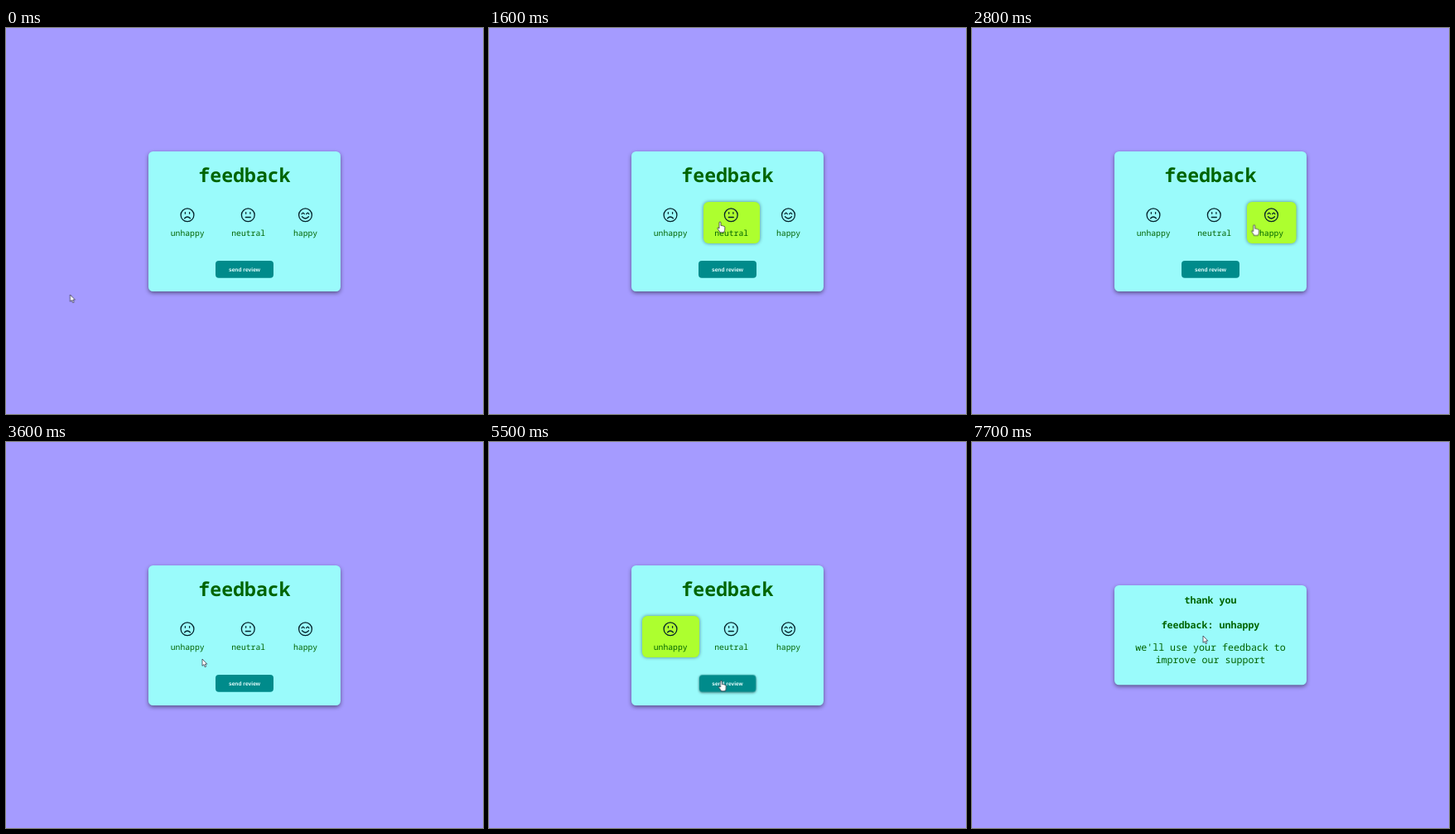
Animation of 576 by 466 pixels, one loop 8 s. Source, as an HTML page:

```html
<!DOCTYPE html>
<html lang="en">
<head>
<meta charset="utf-8">
<title>Feedback</title>
<style>
html, body { margin: 0; width: 100%; height: 100%; overflow: hidden; background: #a59bff; }
svg { display: block; width: 576px; height: 466px; }
text { font-family: "Noto Sans Mono", monospace; fill: #006400; text-anchor: middle; text-rendering: geometricPrecision; }
.title { font-size: 23.2px; font-weight: 700; }
.label { font-size: 9.72px; }
.note { font-size: 11.65px; }
.bold { font-weight: 700; }
.card { fill: #9afbfb; filter: drop-shadow(0 2px 2.5px #0007); }
.face { fill: none; stroke: #04222a; stroke-width: 1.3; stroke-linecap: round; }
.hover { fill: #adff2f; filter: drop-shadow(0 0 2px #0007); opacity: 0; }
.button text { font: 700 6.65px "Liberation Sans", sans-serif; fill: #e8ffff; }
.button { transform-origin: 288px 291.5px; }
.cursor path { fill: #fff; stroke: #223; stroke-width: .7; stroke-linejoin: round; }

.form, .thanks, .hover, .button, .button rect, .cursor, .hand, .arrow {
  animation: 8s step-end infinite;
}
.form { animation-name: form; }
.thanks { animation-name: thanks; }
.unhappy { animation-name: unhappy; }
.neutral { animation-name: neutral; }
.happy { animation-name: happy; }
.button { animation-name: press; }
.button rect { animation-name: lift; }
.cursor { animation-name: move; }
.hand { animation-name: hand; }
.arrow { animation-name: arrow; }

@keyframes form { 0% { opacity: 1; } 70%, 100% { opacity: 0; } }
@keyframes thanks { 0% { opacity: 0; } 70%, 100% { opacity: 1; } }

@keyframes unhappy {
  0% { opacity: 0; }
  8.75% { opacity: 0; animation-timing-function: steps(2); }
  11.25% { opacity: .62; }
  12.5% { opacity: .86; }
  13.75% { opacity: 1; }
  15% { opacity: 1; animation-timing-function: steps(3); }
  18.75% { opacity: 0; }
  46.25% { opacity: 0; animation-timing-function: steps(3); }
  50%, 100% { opacity: 1; }
}
@keyframes neutral {
  0% { opacity: 0; }
  15% { opacity: 0; animation-timing-function: steps(3); }
  18.75% { opacity: 1; }
  23.75% { opacity: 1; animation-timing-function: steps(3); }
  27.5% { opacity: 0; }
  37.5% { opacity: 0; animation-timing-function: steps(2); }
  40% { opacity: .7; animation-timing-function: steps(3); }
  43.75%, 100% { opacity: 0; }
}
@keyframes happy {
  0% { opacity: 0; }
  25% { opacity: 0; animation-timing-function: steps(2); }
  27.5% { opacity: .82; }
  28.75% { opacity: 1; }
  36.25% { opacity: 1; animation-timing-function: steps(3); }
  40%, 100% { opacity: 0; }
}
@keyframes press {
  0% { transform: none; }
  67.5%, 100% { transform: scale(.98); }
}
@keyframes lift {
  0% { filter: none; }
  67.5%, 100% { filter: drop-shadow(0 1.5px 1.5px #0007); }
}
@keyframes hand {
  0% { opacity: 0; }
  8.75% { opacity: 1; }
  41.25% { opacity: 0; }
  46.25% { opacity: 1; }
  62.5% { opacity: 0; }
  66.25% { opacity: 1; }
  77.5%, 100% { opacity: 0; }
}
@keyframes arrow {
  0% { opacity: 1; }
  8.75% { opacity: 0; }
  41.25% { opacity: 1; }
  46.25% { opacity: 0; }
  62.5% { opacity: 1; }
  66.25% { opacity: 0; }
  77.5%, 100% { opacity: 1; }
}
@keyframes move {
  0% { transform: translate(77.5px, 322px); animation-timing-function: steps(3); }
  3.75% { transform: translate(116px, 306px); animation-timing-function: steps(2); }
  6.25% { transform: translate(158px, 276px); animation-timing-function: steps(2); }
  8.75% { transform: translate(189px, 252px); animation-timing-function: steps(2); }
  11.25% { transform: translate(198.5px, 243px); animation-timing-function: steps(3); }
  15% { transform: translate(252px, 236px); }
  16.25% { transform: translate(268px, 235px); animation-timing-function: steps(3); }
  20% { transform: translate(279px, 234px); animation-timing-function: steps(2); }
  22.5% { transform: translate(284px, 234px); }
  23.75% { transform: translate(312px, 234px); }
  25% { transform: translate(337px, 234px); animation-timing-function: steps(2); }
  27.5% { transform: translate(348px, 234px); animation-timing-function: steps(5); }
  33.75% { transform: translate(352px, 236px); animation-timing-function: steps(3); }
  37.5% { transform: translate(318px, 241px); animation-timing-function: steps(2); }
  40% { transform: translate(270px, 253px); }
  41.25% { transform: translate(250px, 263px); animation-timing-function: steps(3); }
  45% { transform: translate(237px, 262px); }
  46.25% { transform: translate(229px, 250px); }
  47.5% { transform: translate(224px, 238px); }
  48.75% { transform: translate(221.5px, 231px); }
  50% { transform: translate(221px, 229px); }
  56.25% { transform: translate(221px, 229px); animation-timing-function: steps(9); }
  67.5% { transform: translate(280.5px, 288px); }
  77.5% { transform: translate(280.5px, 289px); }
  80% { transform: translate(280.5px, 289px); animation-timing-function: steps(7); }
  88.75%, 100% { transform: translate(279px, 234px); }
}
</style>
</head>
<body>
<svg viewBox="0 0 576 466">
  <g class="form">
    <rect class="card" x="172" y="149" width="232" height="169" rx="5.5"/>
    <text class="title" x="288" y="186">feedback</text>

    <rect class="hover unhappy" x="185" y="210" width="69" height="50" rx="6"/>
    <rect class="hover neutral" x="259" y="210" width="68" height="50" rx="6"/>
    <rect class="hover happy" x="332" y="210" width="59.5" height="50" rx="6"/>

    <g class="face" transform="translate(219 225.8)">
      <circle r="7.9"/>
      <path d="M-2.6-3.2v1.6M2.6-3.2v1.6M-3.4 4Q0 .4 3.4 4"/>
    </g>
    <g class="face" transform="translate(292.3 225.8)">
      <circle r="7.9"/>
      <path d="M-2.6-3.2v1.6M2.6-3.2v1.6M-3 2.7H3"/>
    </g>
    <g class="face" transform="translate(361.5 225.8)">
      <circle r="7.9"/>
      <path d="M-4.3-1.2q1.5-2.8 3 0M1.3-1.2q1.5-2.8 3 0M-4 2Q0 6.4 4 2"/>
    </g>
    <text class="label" x="219.2" y="251.4">unhappy</text>
    <text class="label" x="292.7" y="251.4">neutral</text>
    <text class="label" x="361.6" y="251.4">happy</text>

    <g class="button">
      <rect x="253" y="281" width="70" height="20.8" rx="4" fill="#008b8b"/>
      <text x="288" y="293.8">send review</text>
    </g>
  </g>

  <g class="thanks">
    <rect class="card" x="172" y="173" width="232" height="120.3" rx="5.5"/>
    <text class="note bold" x="288" y="194.8">thank you</text>
    <text class="note bold" x="288" y="224.6">feedback: unhappy</text>
    <text class="note" x="288" y="252">we'll use your feedback to</text>
    <text class="note" x="288" y="267.2">improve our support</text>
  </g>

  <g class="cursor">
    <path class="arrow" d="M0 0V8.3L1.9 6.6 3.2 9.7 4.6 9.1 3.3 6.1H5.8Z"/>
    <path class="hand" d="M-1 1A1 1 0 0 1 1 1V4.6Q2 4 2.8 4.9 3.8 4.5 4.5 5.4 5.8 5.2 5.8 6.6V9Q5.8 11 4.8 12V12.8H-.4V12L-3 8.2Q-3.4 7-2.2 7L-1 8Z"/>
  </g>
</svg>
</body>
</html>
```
